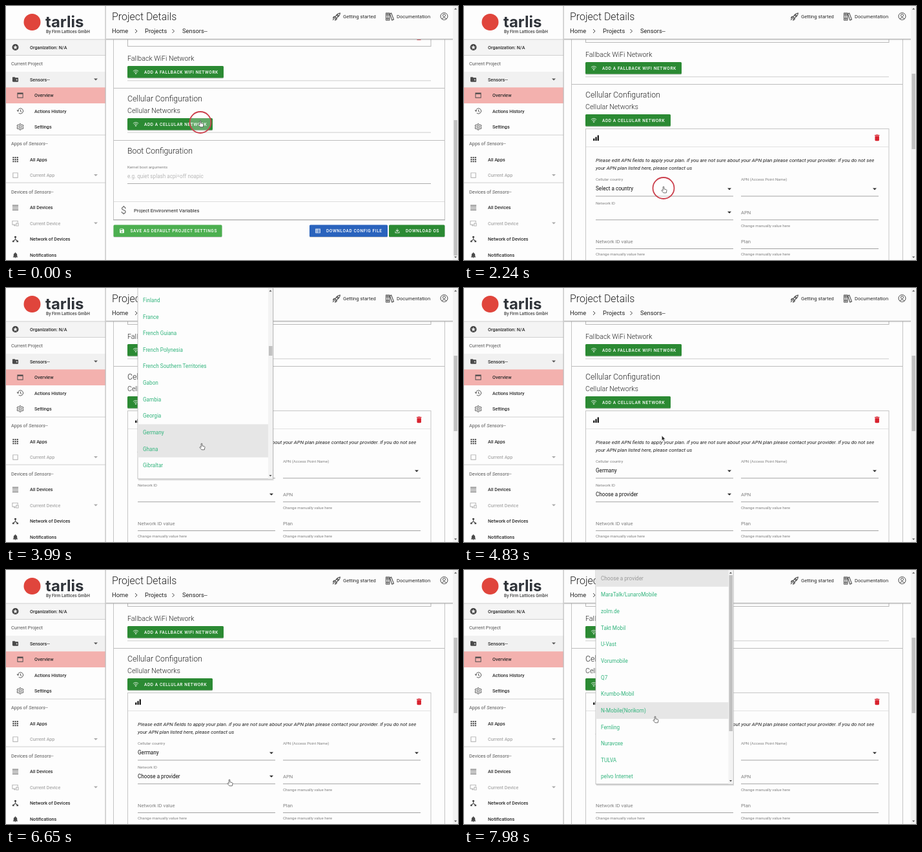
Recreate the animation shown at these times as an HTML page. Size 700 by 394 pixels, loop 8000 ms.

```html
<!DOCTYPE html>
<html lang="en">
<head>
<meta charset="utf-8">
<title>Project Details</title>
<style>
  html, body { margin: 0; width: 100%; height: 100%; overflow: hidden; background: #fdfdfd; }
  #stage { display: block; width: 100vw; height: 100vh; font-family: Roboto, sans-serif; }
  text { white-space: pre; }
  .caps { font-weight: 500; letter-spacing: .089em; }
</style>
</head>
<body>
<svg id="stage" viewBox="0 0 700 394"></svg>
<script>
const LOOP = 8000, ROW = 25.65, GROWTH = 240;
const INK = '#2b2b2b', GREY = '#808080', PALE = '#aaa', GREEN = '#2b8a33', RED = '#d8232f', HOVER = '#e6e6e6';

// Shapes on a 24 unit grid
const ICON = {
  star: 'M12 1a11 11 0 1 0 0 22a11 11 0 1 0 0-22zM12 5l2 5h5l-4 3.500 1.500 5.500-4.500-3.300-4.500 3.300 1.500-5.500-4-3.500h5z',
  folder: 'M10 4H4c-1.100 0-2 .9-2 2v12c0 1.100.9 2 2 2h16c1.100 0 2-.9 2-2V8c0-1.100-.9-2-2-2h-8zM17 10l1 2h2l-1.500 1.500.5 2-2-1-2 1 .5-2L14 12h2z',
  window: 'M2 3h20v18H2zM4 8v11h16V8z',
  apps: [3, 10, 17].map(y => [3, 10, 17].map(x => `M${x} ${y}h4.500v4.500h-4.500z`).join('')).join(''),
  box: 'M3 3h18v18H3zM5 5v14h14V5z',
  list: 'M2 4h20v2H2zM2 9h20v2H2zM2 14h20v2H2zM2 19h20v2H2z',
  screen: 'M1 3h20v6h-2V5H3v11h9v5H7v-2h3v-1H1zM14 11h9v11h-9zM16 13v7h5v-7z',
  hub: 'M9 2h6v6h-2v4l7 5h2v5h-6v-4l-4-4-4 4v4H2v-5h2l7-5V8H9z',
  bell: 'M12 22a2 2 0 0 0 2-2h-4a2 2 0 0 0 2 2zM18 16v-5c0-3.100-1.600-5.600-4.500-6.300V4a1.500 1.500 0 0 0-3 0v.7C7.600 5.400 6 7.900 6 11v5l-2 2v1h16v-1z',
  trash: 'M6 19c0 1.100.9 2 2 2h8c1.100 0 2-.9 2-2V7H6zM19 4h-3.500l-1-1h-5l-1 1H5v2h14z',
  save: 'M17 3H5a2 2 0 0 0-2 2v14a2 2 0 0 0 2 2h14a2 2 0 0 0 2-2V7zM12 19a3 3 0 1 1 0-6a3 3 0 1 1 0 6zM15 9H5V5h10z',
  table: 'M2 3h20v18H2zM4 5v3h4V5zM10 5v3h10V5zM4 10v4h4v-4zM10 10v4h10v-4zM4 16v3h4v-3zM10 16v3h10v-3z',
  download: 'M11 3h2v9l4-4 1.500 1.500L12 16 5.500 9.500 7 8l4 4zM3 14h2v5h14v-5h2v7H3z',
  signal: 'M2 14h5v8H2zM9.500 9h5v13h-5zM17 3h5v19h-5z'
};
// Line icons
const LINES = {
  history: 'M4 12a9 9 0 1 1 3 6.500M1 9l3 4 4-3M13 7v6l4 2',
  gear: 'M12 8a4 4 0 1 0 0 8a4 4 0 1 0 0-8zM10 2h4l1 3 3 1 3-1 2 4-3 2v2l3 2-2 4-3-1-3 1-1 3h-4l-1-3-3-1-3 1-2-4 3-2v-2l-3-2 2-4 3 1 3-1z',
  wifi: 'M1 9q11-9 22 0M5 13.500q7-6 14 0M9 18q3-2.500 6 0l-3 2.500z',
  user: 'M12 1a11 11 0 1 0 0 22a11 11 0 1 0 0-22zM12 5a4 4 0 1 0 0 8a4 4 0 1 0 0-8zM5 20q7-8 14 0',
  rocket: 'M8 14Q11 4 22 2Q20 13 10 16zM9 11l-5 1-2 4 6-2M13 15l-1 5-4 2 2-6M6 17l-5 5M15 7a2 2 0 1 0 .1 0',
  books: 'M1 2h5v20H1zM6 2h5v20H6zM12 4l4-2 7 18-5 2zM1 7h10M1 17h10'
};

const text = (x, y, size, str, fill = INK, extra = '') =>
  `<text x="${x}" y="${y + size * .35}" font-size="${size}" fill="${fill}" ${extra}>${str}</text>`;
const rect = (x, y, w, h, fill, extra = '') =>
  `<rect x="${x}" y="${y}" width="${w}" height="${h}" fill="${fill}" ${extra}/>`;
const icon = (name, x, y, size, color = '#4a4a4a') => {
  const k = size / 24;
  const paint = ICON[name] ? `fill="${color}" fill-rule="evenodd"` : `fill="none" stroke="${color}" stroke-width="2"`;
  return `<path transform="translate(${x - size / 2} ${y - size / 2}) scale(${k})" d="${ICON[name] || LINES[name]}" ${paint}/>`;
};
const caret = (x, y, color = INK) => `<path d="M${x - 3} ${y - 1.5}h6l-3 3z" fill="${color}"/>`;
const bold = 'font-weight="500"', light = 'font-weight="300"';

const button = (x, y, w, label, glyph, fill = GREEN) =>
  rect(x, y + 1, w, 18.5, '#0003', 'rx="1.5"') + rect(x, y, w, 18.5, fill, 'rx="1.5"') +
  icon(glyph, x + 13, y + 9.3, 9, '#fff') + text(x + 26, y + 9.3, 6.55, label, '#fff', 'class="caps"');

function sidebar() {
  const item = (y, label, glyph, x = 37, color = INK) =>
    icon(glyph, x > 40 ? 22 : 14.5, y, 11, color === INK ? '#4a4a4a' : color) + text(x, y, 7.2, label, color, bold);
  const heading = (y, str) => text(8, y, 7.33, str, '#555');
  const sensors = '<tspan font-style="italic">Sensors--</tspan>';
  return rect(0, 0, 154, 394, '#fdfdfd') +
    '<circle cx="40.500" cy="25" r="13" fill="#e0453c"/>' +
    text(61, 24.5, 24, 'tarlis', '#30343a', 'font-weight="700" style="font-family:Inter,sans-serif"') +
    text(62, 39.5, 6.6, 'By Firm Lattices GmbH', '#444', bold) +
    rect(0, 52, 154, 24.5, '#f4f4f4') + rect(0, 102, 154, 24.5, '#f1f1f1') + rect(0, 126.3, 154, 24.7, '#f3b1ae') +
    [51.4, 76, 199.6, 273.6].map(y => rect(0, y, 154, 1, '#d0d0d0')).join('') +
    item(64, 'Organization: N/A', 'star') + heading(89, 'Current Project') +
    item(114, 'Sensors--', 'folder') + caret(139, 114, '#555') +
    item(138.5, 'Overview', 'window', 44) + item(163, 'Actions History', 'history', 44) + item(187.5, 'Settings', 'gear', 44) +
    heading(213, 'Apps of ' + sensors) + item(238, 'All Apps', 'apps') +
    item(262.5, 'Current App', 'box', 37, PALE) + caret(139, 262.5, PALE) +
    heading(288, 'Devices of ' + sensors) + item(312.5, 'All Devices', 'list') +
    item(337, 'Current Device', 'screen', 37, PALE) + caret(139, 337, PALE) +
    item(361.7, 'Network of Devices', 'hub') + item(386.5, 'Notifications', 'bell') +
    rect(153.5, 0, 1.2, 394, '#b9b9b9');
}

function header() {
  const crumb = (x, str) => text(x, 38.5, 9.33, str, '#222');
  const sep = x => `<path d="M${x} 36l3 3-3 3" fill="none" stroke="#444"/>`;
  return rect(155, 0, 537, 51, '#fcfcfc') + rect(155, 50.8, 537, 1.3, '#b5b5b5') + rect(155, 52, 537, 1.5, '#0001') +
    text(164, 16, 15.9, 'Project Details', '#222', light) +
    crumb(164, 'Home') + sep(200) + crumb(215, 'Projects') + sep(257.5) + crumb(273, 'Sensors--') +
    icon('rocket', 512, 16.5, 13) + text(522, 16.5, 7.65, 'Getting started') +
    icon('books', 594.5, 16.5, 13) + text(605, 16.5, 7.65, 'Documentation') + icon('user', 678.5, 16, 12);
}

const divider = y => rect(167, y, 512, 1, '#bcbcbc');

function lowerSections() {
  return rect(166.5, -400, 513, 731.5, 'none', 'stroke="#c4c4c4"') + rect(166, 331, 514, 1.4, '#b0b0b0') +
    rect(188, 195.5, 470, 1.5, '#dedede') + divider(208) +
    text(188, 225, 12.3, 'Boot Configuration', '#222', light) +
    text(188, 249.5, 6.15, 'Kernel boot arguments', GREY) +
    text(188, 264, 8.17, 'e.g. quiet splash acpi=off noapic', '#b8b8b8') +
    rect(188, 275, 470, .8, '#999') + rect(167, 303, 512, .8, '#d5d5d5') +
    text(178, 317, 15, '$', '#333', light) + text(198, 317, 7.6, 'Project Environment Variables', '#222') +
    button(166.5, 339.5, 168, 'SAVE AS DEFAULT PROJECT SETTINGS', 'save', '#4caf50') +
    button(470, 339.5, 121, 'DOWNLOAD CONFIG FILE', 'table', '#2a63bd') +
    button(593, 339.5, 86.5, 'DOWNLOAD OS', 'download');
}

function cellularCard() {
  const line = (x, y) => rect(x, y, 213, .8, '#8c8c8c');
  const label = (x, y, str) => text(x, y, 6.12, str, GREY);
  const empty = (x, y, str) => text(x, y, 7.67, str, GREY);
  const hint = (x, y) => label(x, y, 'Change manually value here');
  const note = (y, str) => text(204, y, 7.89, str, '#222', 'font-style="italic"');
  return rect(188.5, 196.5, 469.5, GROWTH, '#fdfdfd', 'stroke="#c6c6c6"') + rect(189, 224, 469, .8, '#ddd') +
    icon('signal', 204.5, 210.5, 10.5, '#111') + icon('trash', 639.7, 210.3, 13, RED) +
    note(245.5, 'Please edit APN fields to apply your plan. if you are not sure about your APN plan please contact your provider. if you do not see') +
    note(257, 'your APN plan listed here, please contact us') +
    label(204, 275, 'Cellular country') + text(204, 289.5, 8.17, 'Select a country', '#111', 'id="country"') +
    caret(411, 290) + line(204, 300.6) +
    label(429, 275, 'APN (Access Point Name)') + caret(636, 290) + line(429, 300.6) +
    label(204, 312, 'Network ID') + text(204, 326, 8.17, '', '#111', 'id="provider"') + caret(411, 326.3) + line(204, 337.4) +
    empty(429, 326.3, 'APN') + line(429, 337.4) + hint(429, 346.5) +
    empty(204, 371, 'Network ID value') + line(204, 382.2) + hint(204, 391) +
    empty(429, 371, 'Plan') + line(429, 382.2) + hint(429, 391);
}

function page() {
  return `<g id="page"><g id="lower">${lowerSections()}</g>` +
    rect(188.5, 30, 469.5, 32.5, '#fdfdfd', 'stroke="#b8b8b8"') + rect(636.5, 45, 6, 7.8, RED) +
    text(188, 81.5, 10.65, 'Fallback WiFi Network', '#222', light) +
    button(188, 93, 149, 'ADD A FALLBACK WIFI NETWORK', 'wifi') + rect(188, 115, 470, 1.5, '#dedede') + divider(127) +
    text(188, 144, 12.3, 'Cellular Configuration', '#222', light) +
    text(188, 162.5, 10.65, 'Cellular Networks', '#222', light) +
    button(188, 174, 132, 'ADD A CELLULAR NETWORK', 'wifi') +
    `<svg id="card" x="0" y="0" width="692" height="0">${cellularCard()}</svg></g>`;
}

function menu(id, w, h, items) {
  const rows = items.map((name, i) => text(8, ROW * (i + .5), 8.2, name, i ? '#35b57f' : '#999')).join('');
  const bar = name => `<rect class="${name}" width="${w}" height="${ROW}" fill="${HOVER}"/>`;
  return `<g id="${id}" transform="translate(204 0)">` +
    rect(1, 1, w, h + 1.5, '#0002') + rect(0, -1, w, h + 1, '#fdfdfd', 'stroke="#b4b4b4" stroke-width=".8"') +
    `<svg width="${w - 7}" height="${h}"><g class="rows">${rect(0, 0, w, ROW, HOVER)}${bar('picked')}${bar('hover')}${rows}</g></svg>` +
    rect(w - 7.5, 0, 7, h, '#f3f3f3') + `<rect class="thumb" x="${w - 6.5}" width="5.500" fill="#c1c1c1"/>` +
    `<path d="M${w - 6} 5.500l2-2.500 2 2.500zM${w - 6} ${h - 6}l2 2.500 2-2.500z" fill="#555"/></g>`;
}

const countries = ('Select a country|Afghanistan|Albania|Algeria|American Samoa|Andorra|Angola|Anguilla|Antarctica|Antigua and Barbuda|Argentina|Armenia|Aruba|' +
  'Australia|Austria|Azerbaijan|Bahamas|Bahrain|Bangladesh|Barbados|Belarus|Belgium|Belize|Benin|Bermuda|Bhutan|Bolivia|Bosnia and Herzegovina|' +
  'Botswana|Bouvet Island|Brazil|Brunei Darussalam|Bulgaria|Burkina Faso|Burundi|Cambodia|Cameroon|Canada|Cape Verde|Cayman Islands|' +
  'Central African Republic|Chad|Chile|China|Christmas Island|Colombia|Comoros|Congo|Cook Islands|Costa Rica|Croatia|Cuba|Cyprus|Czech Republic|' +
  'Denmark|Djibouti|Dominica|Dominican Republic|Ecuador|Egypt|El Salvador|Equatorial Guinea|Eritrea|Estonia|Ethiopia|Falkland Islands|' +
  'Faroe Islands|Fiji|Finland|France|French Guiana|French Polynesia|French Southern Territories|Gabon|Gambia|Georgia|Germany|Ghana|Gibraltar|Greece').split('|');
const providers = ('Choose a provider|MaraTalk/LunaroMobile|zolm.de|Takt Mobil|U-Vast|Vorumobile|Q7|Krumbo-Mobil|' +
  'N-Mobile(Norikom)|Fernling|Nuravoxe|TULVA|pelvo Internet').split('|');
const maxScroll = ROW * (countries.indexOf('Finland') + .5) - 19;

const stage = document.getElementById('stage');
stage.innerHTML = rect(0, 0, 700, 394, '#fdfdfd') + page() + header() + sidebar() +
  rect(692, 0, 8, 394, '#f3f3f3') + '<rect id="thumb" x="693.500" width="5.500" fill="#c1c1c1"/>' +
  '<path d="M694 5.500l2.200-2.500 2.200 2.500zM694 388.500l2.200 2.500 2.200-2.500z" fill="#666"/>' +
  menu('countries', 209.5, 296, countries) + menu('providers', 213, 332, providers) +
  '<circle id="ring" r="16.500" fill="#fff4" stroke="#cb3f4c" stroke-width="1.800"/>' +
  '<g id="hand"><path transform="translate(0 .5) scale(.85)" d="M-1 0q1-1 2 0v4l4 1q1 .5 .8 2l-.8 4h-5l-3.500-4q0-1.500 1.500-1l1 .8z" fill="#fff" stroke="#444" stroke-width=".9"/></g>' +
  '<path id="arrow" d="M0 0v7.500l1.800-1.500 1.200 2.600 1.300-.6-1.200-2.500h2.400z" fill="#222" stroke="#fff" stroke-width=".5"/>';

const $ = id => document.getElementById(id);
const set = (el, attrs) => { for (const key in attrs) el.setAttribute(key, attrs[key]); };
const show = (el, on) => { el.style.display = on ? '' : 'none'; };
const between = (v, a, b) => v >= a && v < b;
const ease = (t, a, b) => { const u = Math.min(1, Math.max(0, (t - a) / (b - a))); return u * u * (3 - 2 * u); };
const mix = (a, b, u) => a + (b - a) * u;

// Pointer tip: time, x, y
const path = [[0, 301, 178], [910, 301, 178], [1400, 304, 215], [2100, 309, 280], [3290, 309, 280], [3990, 303, 241],
  [4400, 300, 227], [4760, 300, 227], [5400, 485, 287], [5600, 485, 287], [6370, 346, 325], [6860, 346, 325],
  [7400, 304, 264], [7490, 304, 264], [7980, 296, 227]];
const clicks = [[0, 140], [2170, 2310], [4550, 4690], [6720, 6860]];

function pointer(t) {
  const i = path.findIndex(p => p[0] > t);
  if (i < 0) return path[path.length - 1].slice(1);
  const [a, b] = [path[i - 1], path[i]], u = ease(t, a[0], b[0]);
  return [mix(a[1], b[1], u), mix(a[2], b[2], u)];
}

function drawMenu(id, open, scroll, y, thumbY, thumbH, picked) {
  const el = $(id), part = name => el.querySelector('.' + name);
  show(el, open);
  if (!open) return;
  set(part('rows'), { transform: `translate(0 ${-scroll})` });
  set(part('hover'), { y: Math.floor((y + scroll) / ROW) * ROW });
  set(part('picked'), { y: picked * ROW });
  set(part('thumb'), { y: thumbY, height: thumbH });
}

function render(t) {
  const grown = ease(t, 100, 400), [x, y] = pointer(t);
  set($('page'), { transform: `translate(0 ${-6 * grown})` });
  set($('lower'), { transform: `translate(0 ${GROWTH * grown})` });
  set($('card'), { height: grown ? 196 + GROWTH * grown : 0 });
  set($('thumb'), { y: mix(177, 105, grown), height: mix(210, 117, grown) });

  const chosen = t >= 4690;
  $('country').textContent = chosen ? 'Germany' : countries[0];
  $('provider').textContent = chosen ? providers[0] : '';

  const countryOpen = between(t, 2310, 4690), providerOpen = t >= 6860, scrolled = ease(t, 2450, 3250);
  const picked = t > 3900 ? countries.indexOf('Germany') : 0;
  drawMenu('countries', countryOpen, maxScroll * scrolled, y, mix(8, 90, scrolled), 15, picked);
  drawMenu('providers', providerOpen, 0, y, 8, 242, 0);

  const overButton = between(x, 188, 320) && between(y, 168, 192);
  const overSelect = between(x, 204, 417) && between(y, 262, 332);
  const hand = countryOpen || providerOpen || overButton || overSelect;
  show($('hand'), hand);
  show($('arrow'), !hand);
  set($(hand ? 'hand' : 'arrow'), { transform: `translate(${x} ${y})` });
  show($('ring'), clicks.some(([a, b]) => between(t, a, b)));
  set($('ring'), { cx: x, cy: y + 2.5 });
}

const start = performance.now();
function tick() {
  render((performance.now() - start) % LOOP);
  requestAnimationFrame(tick);
}
tick();
</script>
</body>
</html>
```
